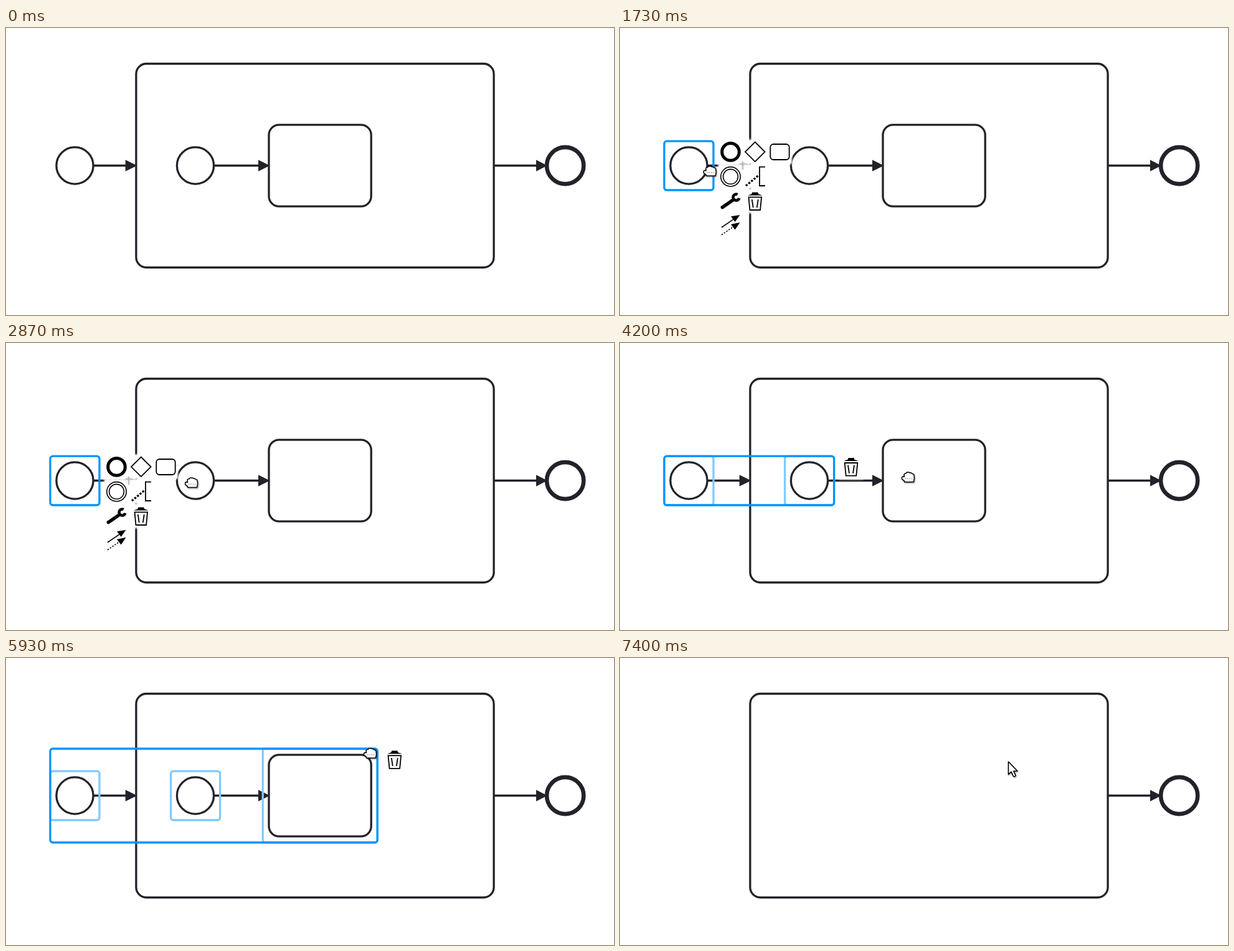
These frames come from a looping animation (976 px wide and 462 px high, 9990 ms). An HTML page:

```html
<!DOCTYPE html>
<html lang="en">
<head>
<meta charset="utf-8">
<title>Process editor: select and delete</title>
<style>
  html, body { margin: 0; width: 100%; height: 100%; overflow: hidden; background: #fff; }
  svg { display: block; width: 100%; height: 100%; }
  .shape { fill: #fff; stroke: #22222a; stroke-width: 3.3; }
  .flow path { stroke: #22222a; stroke-width: 3.3; fill: none; }
  .flow path + path { fill: #22222a; stroke: none; }
  .sel rect { fill: none; stroke: #0095ff; stroke-width: 3.3; }
  .sel .soft { stroke: #80caff; }
  .icon { fill: none; stroke: #000; stroke-width: 1.8; }
  .solid { fill: #000; stroke: none; }
  .tip rect { fill: #fff; stroke: #bbb; }
  .tip text { font: 20px "Open Sans", sans-serif; fill: #444; }
</style>
</head>
<body>
<svg viewBox="0 0 976 462">
  <defs>
    <filter id="glow" x="-30%" y="-30%" width="160%" height="160%"><feGaussianBlur stdDeviation="1.6"/></filter>
    <filter id="shade" x="-30%" y="-30%" width="180%" height="180%">
      <feDropShadow dx="1" dy="1.3" stdDeviation="0.9" flood-opacity="0.4"/>
    </filter>
    <g id="cell">
      <rect x="-19.7" y="-19.7" width="39.4" height="39.4" fill="#fff" filter="url(#glow)"/>
      <rect x="-18" y="-18" width="36" height="36" fill="#fff"/>
    </g>
    <g id="bin" class="icon">
      <path class="solid" d="M-12 -9.8L-5.5 -12L-4.5 -14.8H4.5L5.5 -12L12 -9.8Z"/>
      <path d="M-10.3 -6.8H10.3L8.3 13.8H-8.3Z"/>
      <path d="M-5 -3.2L-3 10M5 -3.2L3 10"/>
    </g>
  </defs>

  <rect class="shape" x="208.9" y="57.5" width="574.2" height="328" rx="16.4"/>
  <circle class="shape" cx="897.7" cy="221.5" r="29.6" style="stroke-width:6.6"/>
  <g class="flow"><path d="M783 221.5H856"/><path d="M851 212.2L869 221.5L851 230.8Z"/></g>

  <g id="doomed">
    <circle class="shape" cx="110.5" cy="221.5" r="29.6"/>
    <circle class="shape" cx="304" cy="221.5" r="29.6"/>
    <rect class="shape" x="422" y="155.8" width="164.2" height="131.4" rx="16.4"/>
    <g class="flow"><path d="M140 221.5H196"/><path d="M191.7 212.2L210.5 221.5L191.7 230.8Z"/></g>
    <g class="flow"><path d="M333.6 221.5H409"/><path d="M405 212.2L423.5 221.5L405 230.8Z"/></g>
  </g>

  <g id="sel" class="sel"></g>

  <g id="pad">
    <g id="cells"></g>
    <g class="icon">
      <circle cx="177.5" cy="199.4" r="13.8" stroke-width="5"/>
      <path d="M216.8 183.5L232.6 199.3L216.8 215.1L201 199.3Z"/>
      <rect x="241.3" y="187" width="30.4" height="25" rx="5"/>
      <circle cx="177.5" cy="239.3" r="15.7" stroke-width="1.6"/>
      <circle cx="177.5" cy="239.3" r="11.9" stroke-width="1.6"/>
      <path d="M202 254L222 237.5" stroke-width="3.3" stroke-dasharray="3.3 2.2"/>
      <path d="M233 223.6H224V254H233"/>
      <path d="M164.3 288.7L180.5 277.6" stroke-width="5.4" stroke-linecap="round"/>
      <path d="M188.7 268A5 5 0 1 0 191.4 273.8" stroke-width="4.6"/>
      <path d="M163 321L183 307.3" stroke-width="1.6"/>
      <path d="M163 333L183 319.3" stroke-width="1.6" stroke-dasharray="2.4 2.2"/>
      <path class="solid" d="M192.5 301L184.7 312L178 303.2ZM192.5 313L184.7 324.8L178 316Z"/>
    </g>
    <use href="#bin" x="216.8" y="279.2"/>
  </g>

  <g id="trash"><use href="#cell"/><use href="#bin"/></g>

  <g id="tip" class="tip">
    <rect x="644.5" y="195.5" width="111" height="40" rx="4"/>
    <text x="700" y="222" text-anchor="middle">Remove</text>
  </g>

  <g id="cursor" stroke="#000" stroke-linejoin="round" fill="#fff" filter="url(#shade)">
    <g id="hand" transform="translate(-10.3 -8.3)" stroke-width="1.5">
      <path d="M4.4 16.4V14.6L.8 12Q-.4 8.4 1.8 7.6L4.3 8L4 4.6Q4.2 2.4 7 2.6Q8 .3 10.4 1Q12.6 .2 13.8 2Q16 1.2 17 3.2Q19.8 3 20 6L20.5 10.5L19.4 16.4Z"/>
      <path d="M5.5 11H18" stroke="#888" stroke-width="1" stroke-dasharray="2 1.3"/>
    </g>
    <path id="arrow" stroke-width="1.6" d="M.7 1.2V21.6L5.3 17.3L8.4 24.2Q9.6 25.6 11.4 24.6Q12.6 23.8 11.9 22.4L9 16.2H15.2Z"/>
  </g>
</svg>
<script>
const LOOP = 9990, STEP = 200 / 3;
const $ = id => document.getElementById(id);
const show = (id, on) => { $(id).style.display = on ? '' : 'none'; };

// pointer hot spot: time, x, y
const path = [
  [533, 320, 350], [667, 204, 279], [800, 204, 279], [1133, 101.5, 231.5],
  [1533, 101.5, 231.5], [2200, 297.5, 224.5], [3933, 297.5, 224.5],
  [4200, 462.3, 215.6], [5467, 462.3, 215.6], [5933, 584.4, 152.9], [6200, 622.8, 165.8]
];

const cols = [177.2, 216.8, 256.3], rows = [199.2, 238.8, 278.5, 317.8], counts = [3, 2, 2, 1];
$('cells').innerHTML = rows.map((y, r) =>
  cols.slice(0, counts[r]).map(x => `<use href="#cell" x="${x}" y="${y}"/>`).join('')).join('');

const box = (x, y, w, h, soft) =>
  `<rect x="${x}" y="${y}" width="${w}" height="${h}" rx="4"${soft ? ' class="soft"' : ''}/>`;
const first = box(71, 182.2, 79, 78.8, true), second = box(264.6, 182.2, 79, 78.8, true);
const looks = [
  '',
  box(71, 182.2, 79, 78.8),
  first + second + box(71, 182.2, 272.6, 78.8),
  first + second + box(412.2, 146, 184, 151, true) + box(71, 146, 525.2, 151)
];
let shown = -1;

function pointer(t) {
  const q = Math.floor((t + 5) / STEP) * STEP + 0.5;
  let i = 0;
  while (i < path.length - 2 && q > path[i + 1][0]) i++;
  const [t0, x0, y0] = path[i], [t1, x1, y1] = path[i + 1];
  const k = Math.min(1, Math.max(0, (q - t0) / (t1 - t0)));
  const e = i === 0 ? k : k * k * (3 - 2 * k);
  return [x0 + (x1 - x0) * e, y0 + (y1 - y0) * e];
}

const inside = (x, y, l, t, r, b) => x > l && x < r && y > t && y < b;

function grabs(x, y, pad, trash) {
  if (pad && inside(x, y, 158, 180, 236, 298)) return false;
  if (trash && inside(x, y, 352, 180, 390, 219)) return false;
  return Math.hypot(x - 110.5, y - 221.5) < 31 || Math.hypot(x - 304, y - 221.5) < 31 ||
    inside(x, y, 418, 152, 590, 291) || Math.abs(x - 209) < 12 ||
    inside(x, y, 140, 209.5, 209, 233.5) || inside(x, y, 334, 209.5, 422, 233.5);
}

function draw(t) {
  const look = t < 1400 || t >= 7400 || (t >= 2600 && t < 2670) ? 0 : t < 3730 ? 1 : t < 5000 ? 2 : 3;
  if (look !== shown) $('sel').innerHTML = looks[shown = look];
  const pad = look === 1 && (t < 2600 || t >= 2870);
  show('doomed', t < 7400);
  show('pad', pad);
  show('trash', look > 1);
  $('trash').setAttribute('transform', look === 2 ? 'translate(371 199.8)' : 'translate(623.8 164)');
  show('tip', t >= 6730 && t < 6870);

  const [x, y] = pointer(t), grab = grabs(x, y, pad, look === 2);
  show('cursor', t >= 530);
  show('hand', grab);
  show('arrow', !grab);
  $('cursor').setAttribute('transform', `translate(${x} ${y})`);
}

const start = performance.now();
function tick() {
  draw((performance.now() - start) % LOOP);
  requestAnimationFrame(tick);
}
tick();
</script>
</body>
</html>
```
